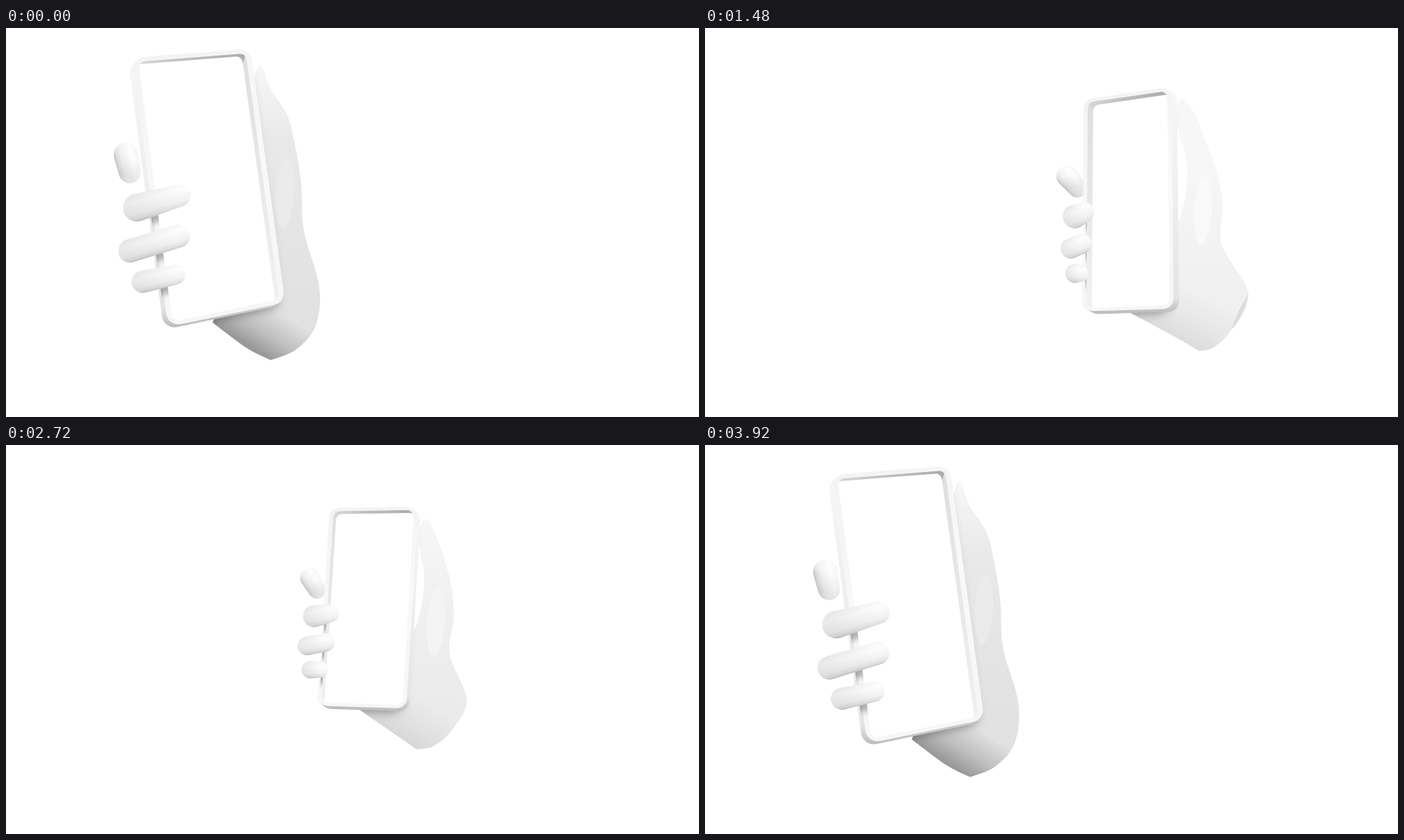
Write an HTML page with a canvas that moves like this. It is 998 by 561 pixels and loops after 3960 ms.

```html
<!DOCTYPE html>
<html lang="en">
<head>
<meta charset="utf-8">
<title>Phone in hand</title>
<style>
  html, body { margin: 0; width: 100%; height: 100%; overflow: hidden; background: #fff; }
  canvas { display: block; }
</style>
</head>
<body>
<canvas id="stage" width="998" height="561"></canvas>
<script>
const ctx = document.getElementById('stage').getContext('2d');
const LOOP = 3960, STEP = 40;

// The swing is measured by the wrist's x position.
const swing = {
  time: [0, 640, 1120, 1680, 1940, 2400, 3040, 3960],
  x: [451, 537, 664, 837, 879, 765, 568, 451]
};

// Phone corners (clockwise from top left) and wrist, at four points of the swing.
const poses = [
  [182,43, 352,30, 402,396, 233,431, 451,372],
  [367,80, 504,81, 497,380, 356,379, 568,370],
  [467,91, 594,89, 577,380, 449,376, 664,368],
  [593,112, 721,78, 747,429, 608,442, 870,398]
];
const poseX = poses.map(row => row[8]);

// The solid model: across the phone, down the phone, depth behind its face.
const WRIST = [1.537, 0.904, 4.84];
const HEEL = [1.025, 1.16, 4.28], CONTACT = [0.444, 1.002, 1.42];
const CUFF = [1.409, 1.071, 3.74];
const thumbInside = [
  [1.03, 0.587, 0.86], [1.066, 0.474, 1.35], [1.071, 0.333, 1.58], [1.017, 0.2, 0.98], [1.011, 0.118, 0.36]
];
const handBack = [
  [1.094, 0.057, 0.56], [1.196, 0.143, 1.47], [1.3, 0.255, 1.37], [1.366, 0.37, 2.1],
  [1.4, 0.52, 2.69], [1.374, 0.7, 2.8], WRIST, CUFF, [1.219, 1.147, 3.7], HEEL
];
const handBase = [HEEL, [0.806, 1.1, 3.63], CONTACT];

// Fingers are tapered capsules; radii are parts of the phone's height.
const indexFinger = { root: [-0.11, 0.407, 0.77], tip: [-0.17, 0.355, -0.23], rootR: 0.043, tipR: 0.048 };
const frontFingers = [
  { root: [-0.112, 0.545, 0.32], tip: [0.138, 0.553, -2.08], rootR: 0.054, tipR: 0.044 },
  { root: [-0.187, 0.69, 0.9], tip: [0.1, 0.698, -1.85], rootR: 0.046, tipR: 0.045 },
  { root: [-0.126, 0.812, 0.69], tip: [0.05, 0.832, -1.43], rootR: 0.043, tipR: 0.039 }
];

const clamp01 = v => Math.max(0, Math.min(1, v));
const gray = (v, a = 1) => `rgba(${v},${v},${v},${a})`;
const mix = (p, q, k) => [p[0] + (q[0] - p[0]) * k, p[1] + (q[1] - p[1]) * k];
const shift = (p, d, k = 1) => [p[0] + d[0] * k, p[1] + d[1] * k];

// Cubic Hermite through (xs, ys); runs straight on past the last knot.
function hermite(xs, ys, x, flatEnds) {
  const last = xs.length - 1;
  const slope = i => (ys[i + 1] - ys[i]) / (xs[i + 1] - xs[i]);
  const tangent = i => {
    if (i === 0) return flatEnds ? 0 : slope(0);
    if (i === last) return flatEnds ? 0 : slope(last - 1);
    const before = xs[i] - xs[i - 1], after = xs[i + 1] - xs[i];
    return (slope(i - 1) * after + slope(i) * before) / (before + after);
  };
  if (x >= xs[last]) return ys[last] + tangent(last) * (x - xs[last]);
  let i = 0;
  while (x > xs[i + 1]) i++;
  const h = xs[i + 1] - xs[i], s = (x - xs[i]) / h, r = 1 - s;
  return ys[i] * (1 + 2 * s) * r * r + ys[i + 1] * s * s * (3 - 2 * s)
    + h * s * r * (tangent(i) * r - tangent(i + 1) * s);
}

// Projection for one moment: the phone face gives the plane, the wrist gives the depth axis.
function makeView(x) {
  const at = i => hermite(poseX, poses.map(row => row[i]), x);
  const [tl, tr, br, bl, wrist] = [0, 2, 4, 6, 8].map(i => [at(i), at(i + 1)]);
  const face = (u, v) => mix(mix(tl, tr, u), mix(bl, br, u), v);
  const flat = face(WRIST[0], WRIST[1]);
  const depth = [0, 1].map(i => (wrist[i] - flat[i]) / WRIST[2]);
  return {
    face,
    project: ([u, v, d]) => shift(face(u, v), depth, d),
    thickness: [0.9 * depth[0] + 1, 4.2],
    height: Math.hypot(br[0] - tr[0], br[1] - tr[1]),
    corners: [tl, tr, br, bl],
    turn: clamp01((x - 451) / 419)
  };
}

// Appends a Catmull-Rom curve to the path.
function curve(path, pts) {
  const at = i => pts[Math.max(0, Math.min(pts.length - 1, i))];
  for (let i = 0; i < pts.length - 1; i++) {
    const [a, b, c, d] = [at(i - 1), at(i), at(i + 1), at(i + 2)];
    path.bezierCurveTo(b[0] + (c[0] - a[0]) / 6, b[1] + (c[1] - a[1]) / 6,
      c[0] - (d[0] - b[0]) / 6, c[1] - (d[1] - b[1]) / 6, c[0], c[1]);
  }
}

function roundQuad(q, r) {
  const path = new Path2D();
  path.moveTo(...mix(q[0], q[1], 0.5));
  for (let i = 1; i <= 4; i++) path.arcTo(...q[i % 4], ...q[(i + 1) % 4], r);
  path.closePath();
  return path;
}

function capsule(a, ra, b, rb) {
  const path = new Path2D();
  const angle = Math.atan2(b[1] - a[1], b[0] - a[0]);
  const gap = Math.hypot(b[0] - a[0], b[1] - a[1]);
  const spread = Math.acos(Math.max(-1, Math.min(1, (ra - rb) / gap)));
  path.arc(...a, ra, angle + spread, angle - spread + 2 * Math.PI);
  path.arc(...b, rb, angle - spread, angle + spread);
  path.closePath();
  return path;
}

function gradient(from, to, stops) {
  const g = ctx.createLinearGradient(...from, ...to);
  stops.forEach(([at, v, a]) => g.addColorStop(at, gray(v, a)));
  return g;
}

function paint(path, fill, rule = 'nonzero') {
  ctx.fillStyle = fill;
  ctx.fill(path, rule);
}

function castShadow(dx, dy, blur, alpha) {
  ctx.shadowColor = gray(0, alpha);
  ctx.shadowBlur = blur;
  ctx.shadowOffsetX = dx;
  ctx.shadowOffsetY = dy;
}

function drawHand(view) {
  const { project, turn } = view;
  const back = handBack.map(project), base = handBase.map(project), inside = thumbInside.map(project);
  const [heel, , contact] = base;
  const tone = Math.round(226 + 18 * turn);
  const path = new Path2D();
  path.moveTo(...inside[0]);
  curve(path, inside.concat(back));
  curve(path, base);
  path.closePath();
  paint(path, gradient(back[0], heel, [[0, 247], [0.25, tone + 7], [0.6, tone + 2], [1, tone - 2]]));

  ctx.save();
  ctx.clip(path);
  const [cx, cy] = project([1.22, 0.55, 2]);
  const glow = new Path2D();
  glow.ellipse(cx, cy, 13, 50, 0.06, 0, 7);
  paint(glow, gray(tone + 11, 0.75));

  // The underside of the heel falls into shade, most of all when seen from the left.
  const middle = mix(contact, heel, 0.5);
  const normal = [heel[1] - contact[1], contact[0] - heel[0]];
  const dark = 0.32 - 0.24 * clamp01(turn * 3.5);
  paint(path, gradient(middle, shift(middle, normal, 0.65), [[0, 0, dark], [0.4, 0, dark * 0.5], [1, 0, 0]]));

  castShadow(-7, 7, 13, 0.34);
  paint(roundQuad(view.corners, 15), '#ddd');
  ctx.restore();

  const open = clamp01((turn - 0.57) / 0.43);
  if (open > 0) {
    const wrist = project(WRIST), end = project(CUFF), [mx, my] = mix(wrist, end, 0.5);
    const cuff = new Path2D();
    cuff.moveTo(...wrist);
    cuff.quadraticCurveTo(mx - 11 * open, my + 3, ...end);
    cuff.quadraticCurveTo(mx + 15 * open, my + 5, ...wrist);
    paint(cuff, gray(220));
  }
}

function fingerShape({ root, tip, rootR, tipR }, view) {
  const a = view.project(root), b = view.project(tip);
  const ra = rootR * view.height, rb = tipR * view.height;
  return { a, b, ra, rb, path: capsule(a, ra, b, rb) };
}

function drawFinger({ a, b, ra, rb, path }) {
  const gap = Math.hypot(b[0] - a[0], b[1] - a[1]);
  const side = b[0] > a[0] ? 1 : -1;
  const down = [side * (a[1] - b[1]) / gap, side * (b[0] - a[0]) / gap];
  const middle = mix(a, b, 0.5), r = Math.max(ra, rb);
  paint(path, gradient(shift(middle, down, -r), shift(middle, down, r),
    [[0, 246], [0.3, 253], [0.7, 242], [0.9, 224], [1, 196]]));
  paint(path, gradient([a[0] - ra, a[1]], b, [[0, 0, 0.08], [1, 0, 0]]));
}

function drawPhone(view, fingers) {
  const { corners, thickness, face } = view;
  const radius = 15 + 3 * clamp01(1 - turnScale(view));
  for (let k = 1; k > 0; k -= 0.1) {
    paint(roundQuad(corners.map(p => shift(p, thickness, k)), radius),
      gradient(corners[0], corners[3], [[0, 246], [0.5, 238], [0.93, 228], [1, 190]]));
  }
  const front = roundQuad(corners, radius);
  paint(front, gradient(corners[0], corners[2], [[0, 243], [0.5, 249], [1, 246]]));

  const [u, v] = [0.043, 0.016];
  const hole = [face(u, v), face(1 - u, v), face(1 - u, 1 - v), face(u, 1 - v)];
  const glass = hole.map(p => shift(p, thickness));
  const holePath = roundQuad(hole, 10);
  ctx.save();
  ctx.clip(holePath);
  paint(holePath, gradient(hole[0], hole[3], [[0, 222], [0.5, 232], [1, 241]]));
  const wall = new Path2D();
  [hole[0], hole[1], mix(glass[1], glass[2], 0.03), mix(glass[0], glass[3], 0.03)]
    .forEach(p => wall.lineTo(...p));
  paint(wall, gradient(hole[0], hole[1], [[0, 216], [0.45, 190], [1, 172]]));
  paint(roundQuad(glass, 9), '#fff');
  ctx.restore();

  // Fingers shade the rim but not the open screen.
  const rim = roundQuad(corners.map(p => shift(p, thickness, 0.5)), radius);
  rim.addPath(holePath);
  ctx.save();
  ctx.clip(rim, 'evenodd');
  castShadow(2, 9, 9, 0.3);
  fingers.forEach(f => paint(f.path, '#eee'));
  ctx.restore();
}

// Size of the phone's corner rounding follows how far it has receded.
function turnScale(view) {
  return view.turn * 5;
}

function draw(time) {
  const view = makeView(hermite(swing.time, swing.x, time, true));
  const fingers = frontFingers.map(f => fingerShape(f, view));
  ctx.fillStyle = '#fff';
  ctx.fillRect(0, 0, 998, 561);
  drawHand(view);
  drawFinger(fingerShape(indexFinger, view));
  drawPhone(view, fingers);
  fingers.forEach(drawFinger);
}

const start = performance.now();
function tick() {
  const time = (performance.now() - start) % LOOP;
  draw(Math.floor(time / STEP) * STEP);
  requestAnimationFrame(tick);
}
tick();
</script>
</body>
</html>
```
